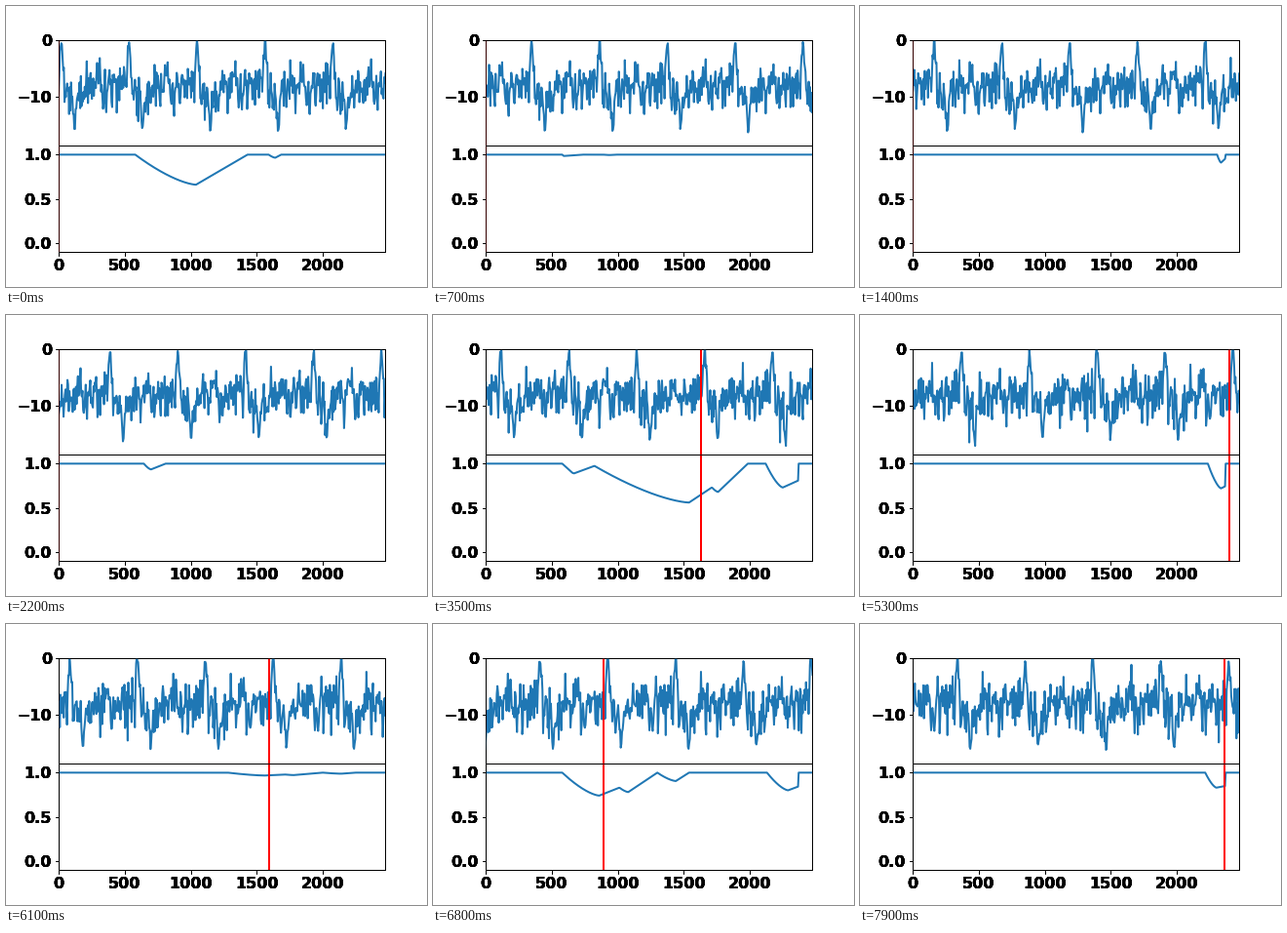
A matplotlib script that plays this animation: 432 by 288 pixels, repeating every 8 s.

```python
import numpy as np
import matplotlib.pyplot as plt
from matplotlib.animation import FuncAnimation

FRAMES, INTERVAL = 80, 100
SPAN, STEP = 2470, 100          # window width and scroll per frame
PERIOD, FIRST_PEAK = 513.6, 20
FIRST_MARK, MARK_GAP = 5130, 5 * 513
GATE_IN, GATE_OUT = 580, 2365   # outside these the gain stays at 1
LIFE = 8                        # frames a dip needs to grow or fade

# frame of full depth, then start, bottom, end and depth at that frame
DIPS = [
    (0, 580, 1040, 1430, .34), (0, 1590, 1640, 1685, .035),
    (14, 2305, 2335, 2400, .09),
    (22, 645, 700, 810, .065),
    (35, 580, 670, 870, .11), (35, 795, 1540, 1985, .44),
    (35, 1600, 1760, 1985, .32), (35, 2120, 2250, 2650, .27),
    (53, 2235, 2335, 2700, .28),
    (68, 580, 860, 1300, .26), (68, 900, 1080, 1300, .22),
    (68, 1300, 1440, 1540, .095), (68, 2130, 2290, 2650, .2),
    (79, 2215, 2300, 2900, .17),
]

plt.rcParams.update({
    "font.family": "DejaVu Sans", "font.size": 16, "font.weight": "bold",
    "text.kerning_factor": 6,
})


def bump(x, centre, width):
    return np.exp(-((x - centre) / width) ** 2)


def make_signal():
    """A repeating beat with a peak and a deep notch, noisier over time."""
    rng = np.random.default_rng(12)
    n = 104
    beats = int((FRAMES * STEP + SPAN) / PERIOD) + 4
    phase = np.arange(n) * PERIOD / n
    shape = (-8.4 + 8 * bump(phase, 0, 12) + 8 * bump(phase, PERIOD, 12)
             + 2 * bump(phase, PERIOD - 25, 30)
             - 3 * bump(phase, 90, 35) - 5 * bump(phase, 100, 9))
    calm = 1 - 0.7 * (bump(phase, 0, 10) + bump(phase, 100, 9))
    common = rng.normal(0, 1.9, n)
    own = rng.normal(0, 1, (beats, n)) * np.linspace(.8, 1.6, beats)[:, None]
    y = shape + calm * (common + own)
    x = FIRST_PEAK - PERIOD + np.arange(beats * n) * PERIOD / n
    return x, np.maximum(y.ravel(), -18)


def dip(x, start, bottom, end, depth):
    """Eased fall to the bottom, then a straight way back."""
    fall = 1 - (1 - np.clip((x - start) / (bottom - start), 0, 1)) ** 1.5
    back = np.clip((end - x) / (end - bottom), 0, 1)
    return depth * np.minimum(fall, back)


def gain(frame):
    loss = np.zeros_like(grid)
    for peak, *shape in DIPS:
        age = frame - peak
        weight = max(0, 1 - abs(age) / LIFE)
        loss = np.maximum(loss, weight * dip(grid + STEP * age, *shape))
    loss = np.minimum(loss, np.clip(grid - GATE_IN, 0, None) * .00135)
    return np.where(grid > GATE_OUT, 1, 1 - loss)


def mark_pos(frame):
    """Newest mark that has entered the window; parked at 0 before any has."""
    left = STEP * frame
    count = (left + SPAN - FIRST_MARK) // MARK_GAP
    return FIRST_MARK + count * MARK_GAP - left if count >= 0 else 0


def add_axes(zorder):
    top, low = fig.subplots(2, 1, sharex=True)
    top.set(xlim=(0, SPAN), ylim=(-18.6, 0), yticks=(-10, 0))
    low.set(ylim=(-.1, 1.1), yticks=(0, .5, 1), xticks=range(0, 2001, 500))
    top.tick_params(axis="x", length=0)
    for ax in (top, low):
        ax.set_zorder(zorder)
        ax.patch.set_visible(False)
    return top, low


grid = np.arange(0, SPAN + 1, 5.0)
sig_x, sig_y = make_signal()

fig = plt.figure(figsize=(6, 4), dpi=72)
fig.subplots_adjust(left=.125, right=.9, bottom=.125, top=.88, hspace=0)
for _ in range(4):              # stacked axes give the heavy labels
    add_axes(0)
top, low = add_axes(1)

level, = top.plot([], [], color="C0", lw=2)
factor, = low.plot([], [], color="C0", lw=2)
marks = [ax.axvline(0, color="red", lw=2) for ax in (top, low)]


def update(frame):
    level.set_data(sig_x - STEP * frame, sig_y)
    factor.set_data(grid, gain(frame))
    x = mark_pos(frame)
    for mark in marks:
        mark.set_xdata([x, x])
    return level, factor, *marks


anim = FuncAnimation(fig, update, frames=FRAMES, interval=INTERVAL,
                     repeat=True, repeat_delay=0)
plt.show()
```
